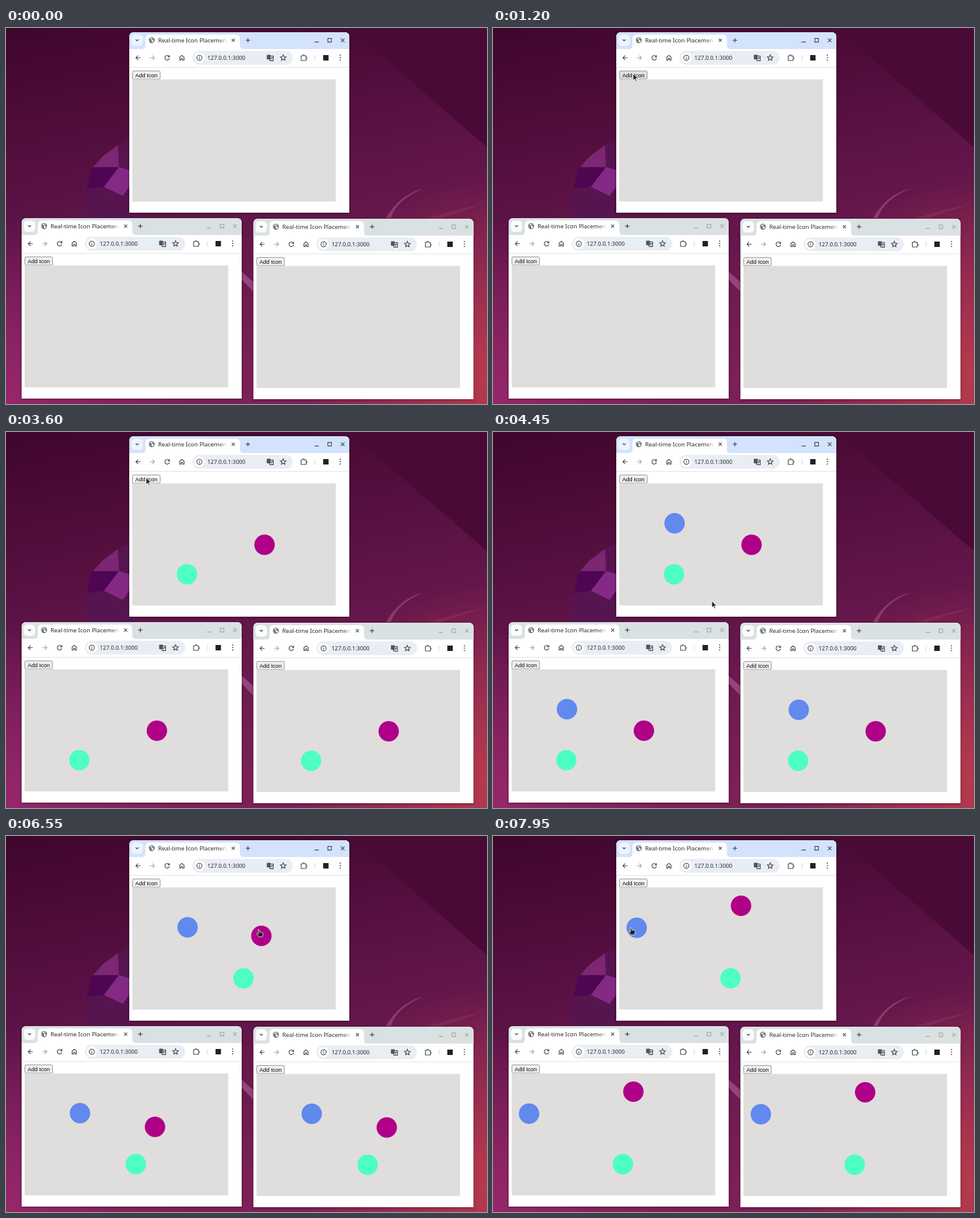
An HTML page for the animation above (8 s loop, 800x625 px).

```html
<!DOCTYPE html>
<html lang="en">
<head>
<meta charset="utf-8">
<title>Real-time Icon Placement</title>
<style>
  html, body { margin: 0; width: 100%; height: 100%; overflow: hidden; background: #541040; }
  svg { display: block; }
  text { font-family: "Noto Sans", "Open Sans", sans-serif; fill: #26282b; }
  .button { font: 9.37px "Liberation Sans", Arial, sans-serif; fill: #000; }
  .icon { fill: none; stroke: #3c4043; stroke-width: 1.15; }
  .off { stroke: #a0a5a8; }
  .frame { filter: drop-shadow(0 1px 2px rgba(0, 0, 0, .4)); }
</style>
</head>
<body>
<svg width="800" height="625" viewBox="0 0 800 625">
  <defs>
    <linearGradient id="wall" x1="0" y1="0" x2=".25" y2="1">
      <stop offset="0" stop-color="#3f062c"/>
      <stop offset=".45" stop-color="#5a1244"/>
      <stop offset="1" stop-color="#7c2158"/>
    </linearGradient>
    <radialGradient id="warm" gradientUnits="userSpaceOnUse" cx="810" cy="580" r="330">
      <stop offset="0" stop-color="#b83a4c"/>
      <stop offset="1" stop-color="#b83a4c" stop-opacity="0"/>
    </radialGradient>
    <radialGradient id="pink" gradientUnits="userSpaceOnUse" cx="0" cy="625" r="300">
      <stop offset="0" stop-color="#96276b"/>
      <stop offset="1" stop-color="#96276b" stop-opacity="0"/>
    </radialGradient>
    <linearGradient id="fade">
      <stop offset="0" stop-color="#fff" stop-opacity="0"/>
      <stop offset="1" stop-color="#fff"/>
    </linearGradient>
  </defs>

  <rect width="800" height="625" fill="url(#wall)"/>
  <path d="M571 0H800V198Z" fill="#490b35"/>
  <rect width="800" height="625" fill="url(#pink)"/>
  <rect width="800" height="625" fill="url(#warm)"/>
  <path d="M210 184L180 197L142 232L130 290V320H210Z" fill="#57154f"/>
  <path d="M186 195L188 231H145L160 214Z" fill="#7c2674"/>
  <path d="M142 232H188L163 264L134 268Z" fill="#4f0652"/>
  <path d="M188 231L210 238V256L194 279L163 264Z" fill="#842a86"/>
  <path d="M632 316Q655 276 694 267Q650 285 640 316Z" fill="#8b3a69"/>
  <path d="M700 317Q740 304 800 291Q745 309 720 317Z" fill="#7d2857"/>
  <path d="M392 405L411 422V438L392 418Z" fill="#94457e"/>

  <g id="windows"></g>
  <g id="cursor" stroke="#fff" stroke-width=".8" stroke-linejoin="round" fill="#222">
    <path id="arrow" d="M0 0V11L2.5 8.7L4.3 12.6L6 11.9L4.2 8H7.8Z"/>
    <path id="hand" d="M-1 .5Q0 -.7 1 .5L1.8 4L6.3 5Q7.8 5.5 7.5 7L6.4 12.3H.8L-3.4 8Q-3.5 6.4 -1.8 6.7L-.2 7.6Z"/>
  </g>
</svg>

<script>
const LOOP = 8000, STEP = 50, PRESS = 150, RADIUS = 17;
const $ = id => document.getElementById(id);
const smooth = u => u * u * (3 - 2 * u);
const easeOut = u => 1 - (1 - u) ** 3;
const leg = (start, end, x, y, ease = smooth) => ({ start, end, x, y, ease });

// Follows legs one after another, resting between them.
function travel([x, y], legs, t) {
  for (const m of legs) {
    const k = m.ease(Math.min(1, Math.max(0, (t - m.start) / (m.end - m.start))));
    x += (m.x - x) * k;
    y += (m.y - y) * k;
  }
  return [x, y];
}

const balls = [
  { color: '#b00087', born: 2300, from: [430, 187.5], legs: [leg(6350, 6900, 412.5, 116)] },
  { color: '#4dffc1', born: 3000, from: [301, 236.5], legs: [leg(5050, 5300, 395, 236.5, easeOut)] },
  { color: '#6189ee', born: 3750, from: [302, 151.7], legs: [leg(7700, 7900, 239, 152.5)] }
];
const pointer = {
  born: 600, from: [800, 330],
  legs: [
    leg(600, 1200, 233, 76),                 // to the button
    leg(4050, 4450, 364, 281),
    leg(4500, 4950, 303, 244),               // to the green ball
    leg(5050, 5300, 397, 244, easeOut),
    leg(5650, 6200, 428, 188),               // to the magenta ball
    leg(6330, 6800, 410.5, 116),
    leg(7200, 7550, 292, 152),               // to the blue ball
    leg(7700, 7900, 229, 152)
  ]
};
const place = (thing, t) => travel(thing.from, thing.legs, t);

const icon = (d, cls = '') => `<path class="icon ${cls}" d="${d}"/>`;
const dot = y => `<circle cx="556" cy="${y}" r="1" fill="#3c4043"/>`;
const star = Array.from({ length: 10 }, (_, i) => {
  const r = i % 2 ? 2.3 : 5, a = i * Math.PI / 5;
  return `${(461 + r * Math.sin(a)).toFixed(1)} ${(49.6 - r * Math.cos(a)).toFixed(1)}`;
}).join('L');

function browser(dx, dy, active) {
  return `<g transform="translate(${dx} ${dy})">
    <path class="frame" d="M205 307V15q0-8 8-8H563q8 0 8 8V307Z" fill="#fff"/>
    <path d="M205 35V15q0-8 8-8H563q8 0 8 8V35Z" fill="${active ? '#d3e3fd' : '#dae1e3'}"/>
    <rect x="208.5" y="11" width="19" height="19" rx="6" fill="#fff" opacity="${active ? .6 : .85}"/>
    ${icon('M215.7 19l2.4 2.4l2.4-2.4')}
    <path d="M226 35q6 0 6-6V18q0-7 7-7H382q7 0 7 7V29q0 6 6 6Z" fill="#fff"/>
    <circle cx="242.4" cy="20.3" r="4.3" fill="#fff" stroke="#50555a" stroke-width="1.1"/>
    <path d="M239 18l3.5 1.5l-1 2.5l1.5 2.3l-3-.8ZM242 17l3.5 1.5l.5 3l-2-1.5Z" fill="#50555a"/>
    <text x="253" y="24" font-size="9.8">Real-time Icon Placemen</text>
    <rect x="353" y="13" width="16" height="16" fill="url(#fade)"/>
    ${icon('M375.5 17.8l5 5m0-5l-5 5')}
    ${icon('M398.8 20.3h7.2m-3.6-3.6v7.2')}
    ${icon('M513.3 23.4h7M535.3 17.3h6v6h-6ZM557 17.3l6 6m0-6l-6 6', active ? '' : 'off')}
    ${icon('M223.5 49.5h-7.5m3.7-3.7l-3.7 3.7l3.7 3.7')}
    ${icon('M239.5 49.5h7.5m-3.7-3.7l3.7 3.7l-3.7 3.7', 'off')}
    ${icon('M271.3 47.5a3.8 3.8 0 1 0 .5 3M271.9 45.2v3h-3')}
    ${icon('M289 48.5l3.6-3l3.6 3v5h-2.4v-3h-2.4v3H289Z')}
    <rect x="310" y="38" width="167" height="23" rx="11.5" fill="#e9eef4"/>
    <circle cx="321.7" cy="49.5" r="8.8" fill="#fff"/>
    <circle class="icon" cx="321.7" cy="49.5" r="4.3"/>
    ${icon('M321.7 49v2.8M321.7 46.9v1.1')}
    <text x="335" y="53" font-size="9.3">127.0.0.1:3000</text>
    <rect x="433.7" y="44.5" width="6.5" height="7.5" rx="1" fill="#50555a"/>
    ${icon('M440.2 46.5h4.3v7.8h-5.5l-1.5-2.3M441 49h3m-1.5 0q-.2 2-2 3')}
    ${icon(`M${star}Z`)}
    ${icon('M491 46.2h2.6q0-1.6 1.3-1.6t1.3 1.6h2.8v2.6q1.7 0 1.7 1.3t-1.7 1.3v2.6h-8Z')}
    <path d="M513.8 45v9.5" stroke="#c9d8ea"/>
    <rect x="527.5" y="45" width="9" height="9" fill="#202124"/>
    ${[45.3, 49.3, 53.3].map(dot).join('')}
    <path d="M205 65.5H571" stroke="#e2e3e4"/>
    <rect class="add" x="210.4" y="71.4" width="46" height="13.6" rx="2" fill="#efefef" stroke="#767676" stroke-width=".8"/>
    <text class="button" x="215" y="81.5">Add Icon</text>
    <rect x="210" y="85.4" width="338.6" height="203" fill="#dfdedd"/>
    ${balls.map(b => `<circle class="ball" r="${RADIUS}" fill="${b.color}"/>`).join('')}
  </g>`;
}

$('windows').innerHTML = browser(-179, 309, false) + browser(206.5, 310, false) + browser(0, 0, true);
const views = [...$('windows').children];
const button = views[2].querySelector('.add');
const show = (el, on) => el.setAttribute('visibility', on ? 'visible' : 'hidden');

function draw(t) {
  views.forEach((view, v) => {
    const lag = v < 2 ? STEP : 0; // the other windows follow one step later
    view.querySelectorAll('.ball').forEach((el, i) => {
      const [x, y] = place(balls[i], t - lag);
      show(el, t >= balls[i].born);
      el.setAttribute('cx', x);
      el.setAttribute('cy', y);
    });
  });

  const [x, y] = place(pointer, t), seen = t >= pointer.born;
  const over = seen && x > 210 && x < 257 && y > 71 && y < 85;
  const pressed = balls.some(b => t >= b.born - PRESS && t < b.born);
  button.setAttribute('fill', pressed ? '#f5f5f5' : over ? '#e0e0e0' : '#efefef');

  const grab = balls.some(b => {
    const [bx, by] = place(b, t);
    return t >= b.born && Math.hypot(x - bx, y - by) < RADIUS;
  });
  show($('arrow'), seen && !grab);
  show($('hand'), seen && grab);
  $('cursor').setAttribute('transform', `translate(${x} ${y})`);
}

const start = performance.now();
function tick(now) {
  const t = Math.max(0, now - start) % LOOP;
  draw(Math.floor(t / STEP) * STEP);
  requestAnimationFrame(tick);
}
draw(0);
requestAnimationFrame(tick);
</script>
</body>
</html>
```
